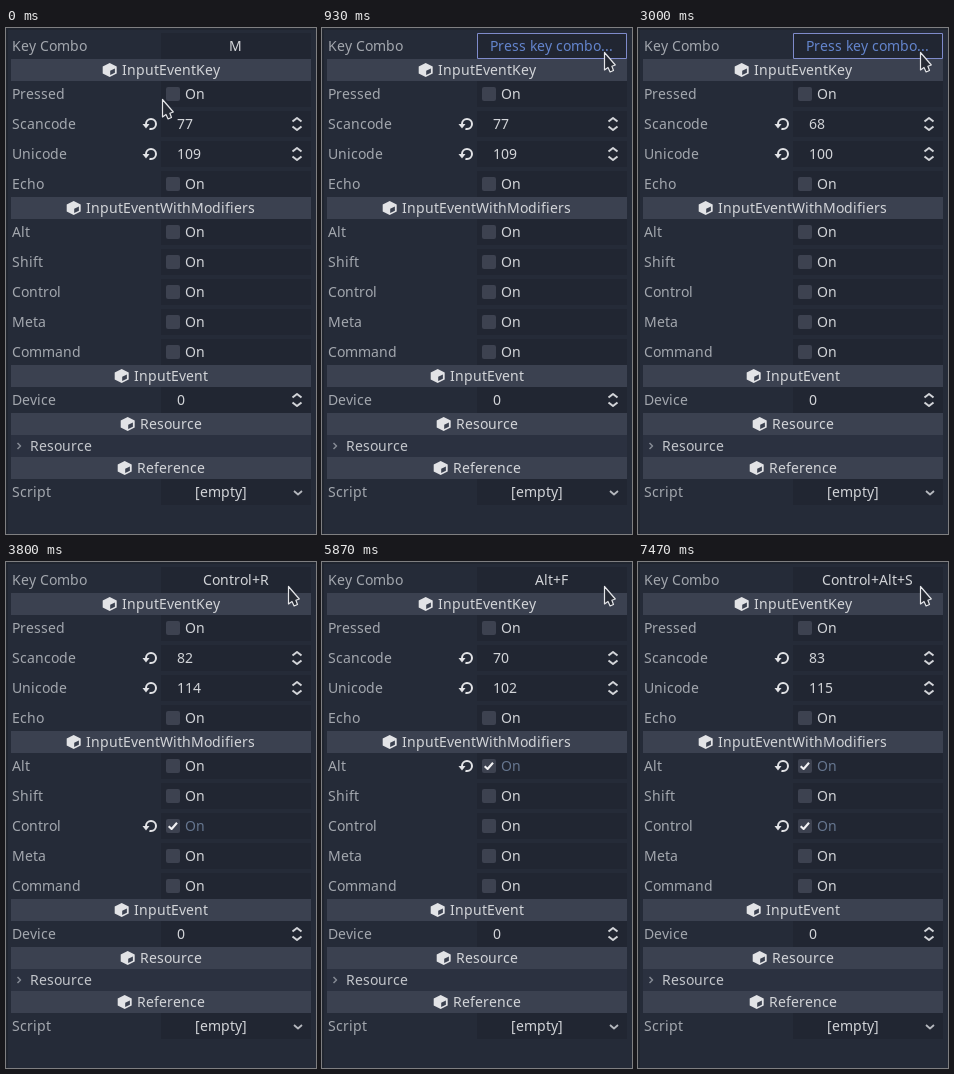
Animation, 310 px wide and 506 px high, one loop 7.6 s. Source, as an HTML page with a canvas:

```html
<!DOCTYPE html>
<html lang="en">
<head>
<meta charset="utf-8">
<title>Key combo inspector</title>
<style>
html, body { margin: 0; width: 100%; height: 100%; overflow: hidden; background: #252b38; }
canvas { display: block; width: 310px; height: 506px; }
</style>
</head>
<body>
<canvas id="stage" width="310" height="506"></canvas>
<script>
const ctx = document.getElementById('stage').getContext('2d');
const LOOP = 7600;
const COLOR = {
  bg: '#252b38', edge: '#20252f', field: '#212632', header: '#3b4150', box: '#3d4250',
  section: '#2b3140', label: '#a3a7ae', text: '#d2d4d8', bright: '#e2e3e6',
  accent: '#6384cc', checked: '#66768f', focus: '#7f8bcb'
};
const PROMPT = 'Press key combo...';

// start ms, combo text, scancode, unicode, checked modifiers, waiting for a key
const states = [
  [0, 'M', 77, 109, []],
  [780, PROMPT, 77, 109, [], true],
  [1330, 'A', 65, 97, []],
  [2200, PROMPT, 65, 97, [], true],
  [2530, 'D', 68, 100, []],
  [3000, PROMPT, 68, 100, [], true],
  [3270, 'Control', 16777238, 0, [], true],
  [3600, 'Control+R', 82, 114, ['Control']],
  [4330, PROMPT, 82, 114, ['Control'], true],
  [4800, 'Alt', 16777240, 0, [], true],
  [5530, 'Alt+F', 70, 102, ['Alt']],
  [6000, PROMPT, 70, 102, ['Alt'], true],
  [6270, 'Control', 16777238, 0, [], true],
  [6600, 'Control+Alt', 16777240, 0, ['Control'], true],
  [6800, 'Control+Alt+S', 83, 115, ['Alt', 'Control']]
];

function rect(x, y, w, h, color) {
  ctx.fillStyle = color;
  ctx.fillRect(x, y, w, h);
}

// Glyphs advance by whole pixels, as in a bitmap font.
const advance = glyph => Math.round(ctx.measureText(glyph).width);

function text(string, x, y, color = COLOR.text) {
  ctx.fillStyle = color;
  for (const glyph of string) {
    ctx.fillText(glyph, x, y + 5);
    x += advance(glyph);
  }
}

function centered(string, x, y, color) {
  const width = [...string].reduce((sum, glyph) => sum + advance(glyph), 0);
  text(string, Math.round(x - width / 2), y, color);
}

function trace(points, close) {
  ctx.beginPath();
  points.forEach(([x, y]) => ctx.lineTo(x, y));
  if (close) ctx.closePath();
}

function line(points, color, width) {
  trace(points);
  ctx.strokeStyle = color;
  ctx.lineWidth = width;
  ctx.stroke();
}

function polygon(points, color) {
  trace(points, true);
  ctx.fillStyle = color;
  ctx.fill();
}

function at(x, y, draw) {
  ctx.save();
  ctx.translate(x, y);
  draw();
  ctx.restore();
}

function cube(x, y) {
  at(x, y, () => {
    polygon([[0, -7], [7, -3.5], [7, 3.5], [0, 7], [-7, 3.5], [-7, -3.5]], COLOR.bright);
    polygon([[0.5, 0.8], [5.2, -1.6], [5.2, 2.8], [0.5, 5.1]], COLOR.header);
  });
}

function resetIcon(x, y) {
  at(x, y, () => {
    ctx.beginPath();
    ctx.arc(1, 0, 5, Math.PI, Math.PI * 2.6);
    ctx.strokeStyle = COLOR.bright;
    ctx.lineWidth = 2;
    ctx.stroke();
    polygon([[-7.5, 0], [-0.5, 0], [-4, 4.5]], COLOR.bright);
  });
}

function header(title, textX, y) {
  rect(5, y - 11, 300, 22, COLOR.header);
  cube(textX - 12.3, y);
  text(title, textX, y);
}

function row(label, y) {
  text(label, 6, y, COLOR.label);
  rect(155, y - 13, 150, 26, COLOR.field);
}

function numberRow(label, y, value, changed) {
  row(label, y);
  if (changed) resetIcon(144, y);
  text(String(value), 171, y);
  for (const side of [-1, 1]) {
    line([[286.5, y + side * 2.5], [291, y + side * 6], [295.5, y + side * 2.5]], COLOR.text, 2);
  }
}

function checkRow(label, y, on) {
  row(label, y);
  ctx.beginPath();
  ctx.roundRect(160, y - 7, 14, 14, 2);
  ctx.fillStyle = COLOR.box;
  ctx.fill();
  if (on) {
    resetIcon(144, y);
    line([[162.7, y + 0.3], [165.6, y + 3], [171, y - 3.2]], '#f0f0f2', 2.1);
  }
  text('On', 179, y, on ? COLOR.checked : COLOR.text);
}

function comboRow(combo, waiting) {
  row('Key Combo', 18);
  if (waiting) {
    ctx.strokeStyle = COLOR.focus;
    ctx.lineWidth = 1;
    ctx.strokeRect(155.5, 5.5, 149, 25);
  }
  centered(combo, 229.7, 18, combo === PROMPT ? COLOR.accent : COLOR.text);
}

function cursor(time) {
  const p = Math.min(1, Math.max(0, (time - 50) / 690));
  const eased = p * p * (3 - 2 * p);
  at(156.5 + 126 * eased, 71.5 - 47 * eased, () => {
    trace([[0, 0], [0, 17.5], [3.5, 15], [5.6, 19.5], [9, 18], [7.4, 13.8], [10.8, 12.5]], true);
    ctx.fillStyle = '#262a34';
    ctx.fill();
    ctx.strokeStyle = '#e4e5e8';
    ctx.lineWidth = 1.2;
    ctx.stroke();
  });
}

function render(time) {
  const [, combo, scancode, unicode, modifiers, waiting] = states.findLast(s => s[0] <= time);
  ctx.font = '14px "Noto Sans", sans-serif';
  ctx.lineJoin = 'round';
  rect(0, 0, 310, 506, COLOR.bg);
  rect(0, 0, 310, 2, COLOR.edge);
  rect(0, 0, 2, 506, COLOR.edge);

  comboRow(combo, waiting);
  header('InputEventKey', 116, 42);
  checkRow('Pressed', 66, false);
  numberRow('Scancode', 96, scancode, true);
  numberRow('Unicode', 126, unicode, unicode > 0);
  checkRow('Echo', 156, false);

  header('InputEventWithModifiers', 80, 180);
  ['Alt', 'Shift', 'Control', 'Meta', 'Command'].forEach((name, i) =>
    checkRow(name, 204 + 30 * i, modifiers.includes(name)));

  header('InputEvent', 128, 348);
  numberRow('Device', 372, 0, false);

  header('Resource', 134, 396);
  rect(5, 407, 300, 22, COLOR.section);
  line([[11.5, 415], [14.5, 418], [11.5, 421]], '#858a94', 1.5);
  text('Resource', 24, 418, '#c3c6cb');

  header('Reference', 131, 440);
  row('Script', 464);
  centered('[empty]', 215, 464);
  line([[288, 463], [292, 466.5], [296, 463]], '#b5b8be', 1.8);

  cursor(time);
}

const start = performance.now();
function tick() {
  render((performance.now() - start) % LOOP);
  requestAnimationFrame(tick);
}
tick();
</script>
</body>
</html>
```
